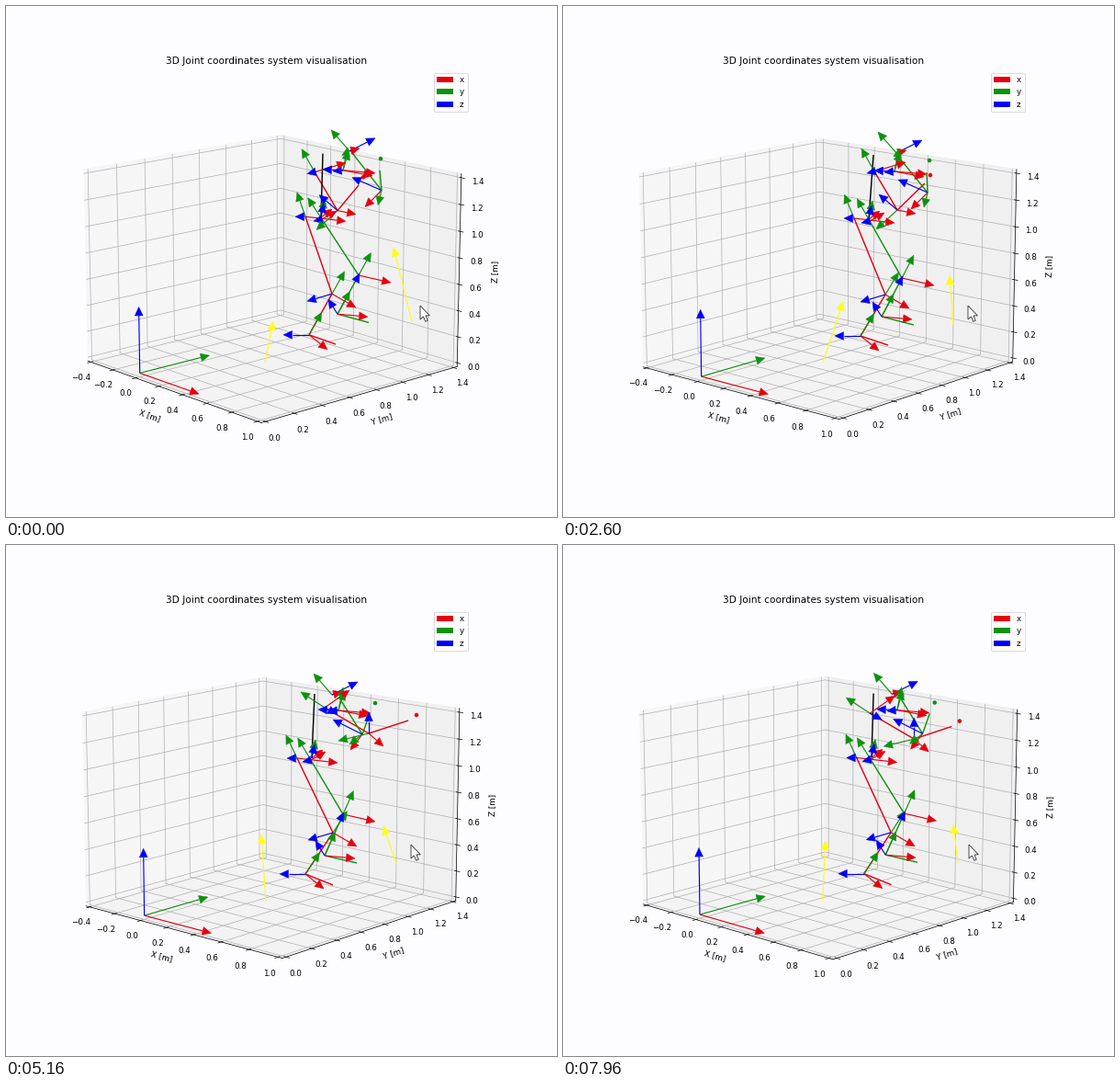
Animation of 600x556 px, one loop 8000 ms. Source, as a matplotlib script:

```python
import numpy as np
import matplotlib.pyplot as plt
from matplotlib.animation import FuncAnimation
from matplotlib.collections import LineCollection, PolyCollection
from matplotlib.patches import Patch, Polygon
from mpl_toolkits.mplot3d import proj3d

W, H, DPI = 600, 556, 64
STEP, LOOP = 40, 8000
BG = "#fdfcfe"
RED, GREEN, BLUE, YELLOW = "#e4000f", "#0e920e", "#0000fb", "#ffff12"
AXIS_COLORS = (RED, GREEN, BLUE)

# Joint in pixels: x, y, parallax when the view turns, shift when the arm is raised
JOINTS = {
    "hip_r": (317, 231, 9, (0, 1)),
    "knee_r": (351, 314, 4, (5, -1)),
    "ankle_r": (324, 359, 6, (2, -1)),
    "toe_r": (354, 369, 5, (2, 1)),
    "hip_l": (334, 234, 10, (-2, 0)),
    "knee_l": (369, 296, 15, (-2, -3)),
    "ankle_l": (347, 338, 14, (0, 0)),
    "toe_l": (382, 347, 13, (0, -1)),
    "pelvis": (333, 232, 10, (0, 0)),
    "neck": (338, 162, 7, (-2, 0)),
    "head": (363, 160, 11, (-8, 3)),
    "chest": (361, 180, 6, (1, 0)),
    "shoulder_l": (362, 160, 13, (2, 8)),
    "elbow_l": (397, 203, 12, (-9, 3)),
    "wrist_l": (396, 181, 11, (0, 3)),
    "hand_l": (399, 168, 9, (3, 4)),
    "shoulder_r": (339, 180, -3, (8, -3)),
    "elbow_r": (364, 222, -3, (31, -17)),
    "wrist_r": (394, 193, -10, (44, -2)),
    "hand_r": (400, 184, -11, (47, 1)),
}
ARM = ("shoulder_r", "elbow_r", "wrist_r", "hand_r")
ARM_DROP = np.array([-12, 6])

CHAINS = [
    (("hip_r", "knee_r", "ankle_r", "toe_r"), RED),
    (("hip_l", "knee_l", "ankle_l", "toe_l"), GREEN),
    (("shoulder_r", "elbow_r", "wrist_r"), RED),
    (("shoulder_l", "elbow_l", "wrist_l"), GREEN),
    (("pelvis", "neck"), "black"),
]
BONES = [(a, b, c) for chain, c in CHAINS for a, b in zip(chain, chain[1:])]

# Leg frames: x and z as offsets, y runs up along the bone
LEG_FRAMES = [
    ("ankle_r", ("ankle_r", "knee_r"), (20, 16), (-28, 0)),
    ("knee_r", ("ankle_r", "knee_r"), (26, 15), (-27, 8)),
    ("hip_r", ("knee_r", "hip_r"), (44, 5), (-11, 0)),
    ("ankle_l", ("ankle_l", "knee_l"), (33, 3), (-10, -16)),
    ("knee_l", ("ankle_l", "knee_l"), (35, 8), (1, -2)),
    ("hip_l", ("knee_l", "hip_l"), (16, -9), (-9, 2)),
]
# Other frames: x, y, z offsets with the arm low and, if different, raised
BODY_FRAMES = [
    ("pelvis", [(12, -9), (4, -20), (3, -15)]),
    ("head", [(11, -3), (-20, -23), (28, -14)]),
    ("chest", [(35, 3), (5, -25), (-22, -1)]),
    ("chest", [(32, 6), (6, -21), (-11, 1)]),
    ("shoulder_r", [(34, -10), (-14, -25), (-8, 2)], [(27, -19), (-26, -17), (13, 7)]),
    ("elbow_r", [(20, 4), (-23, 21), (-20, -17)], [(16, 14), (-33, 8), (0, -23)]),
    ("elbow_l", [(-18, 18), (-4, 16), (-32, -14)], [(-13, 17), (-14, 11), (-32, -16)]),
]

POINTER = np.array([(0, 0), (0, 15), (3.4, 12), (5.8, 17.3), (8.2, 16.2),
                    (5.9, 11), (10.3, 10.8)])

plt.rcParams.update({"font.family": "DejaVu Sans", "font.size": 9.87})
fig = plt.figure(figsize=(W / DPI, H / DPI), dpi=DPI, facecolor=BG)

SIDE, LEFT, BOTTOM = 447.5, 59.5, 40.3
ax = fig.add_axes([LEFT / W, BOTTOM / H, SIDE / W, SIDE / H], projection="3d")
ax.set_facecolor("none")
ax.set_title("3D Joint coordinates system visualisation", fontsize=11.82)
ax.set_xlabel("X [m]", labelpad=5)
ax.set_ylabel("Y [m]", labelpad=5)
ax.set_zlabel("Z [m]")
ax.set_xticks(np.arange(-2, 6) / 5)
ax.set_yticks(np.arange(8) / 5)
ax.set_zticks(np.arange(8) / 5)
ax.tick_params(axis="x", pad=4.3)
ax.tick_params(axis="y", pad=4.3)
PAD = 1.4 / 48
ax.set_xlim(-0.4 - PAD, 1 + PAD)
ax.set_ylim(-PAD, 1.4 + PAD)
ax.set_zlim(-PAD, 1.4 + PAD)
ax.legend(handles=[Patch(fc=c, lw=0, label=n) for c, n in zip(AXIS_COLORS, "xyz")],
          loc="upper right")

top = fig.add_axes([0, 0, 1, 1], zorder=5)
top.set_xlim(0, W)
top.set_ylim(H, 0)
top.axis("off")

frame_count = 1 + len(LEG_FRAMES) + len(BODY_FRAMES)
arrow_colors = list(AXIS_COLORS) * frame_count + [YELLOW] * 2
bones = LineCollection([], colors=[b[2] for b in BONES], linewidths=1.6, zorder=2)
shafts = LineCollection([], colors=arrow_colors, linewidths=1.3, zorder=3)
heads = PolyCollection([], facecolors=arrow_colors, edgecolors=arrow_colors,
                       linewidths=0.5, zorder=4)
for item in (bones, shafts, heads):
    top.add_collection(item, autolim=False)
dots = top.scatter([0, 0], [0, 0], s=26, c=[RED, GREEN], linewidths=0, zorder=5)
pointer = Polygon(POINTER, closed=True, fc="white", ec="#3a3a3a", lw=1, zorder=6)
top.add_patch(pointer)


def track(t, *points):
    """Straight-line motion through (time, value) points."""
    times, values = zip(*points)
    return np.interp(t, times, values)


def smooth(t, start, end):
    u = np.clip((t - start) / (end - start), 0, 1)
    return u * u * (3 - 2 * u)


def shifted(x, y, depth, turn):
    """Pixel position after the view has turned by the given share."""
    back = (1 - turn) * depth
    return np.array([x + back, y - 0.2 * back])


def head(tail, tip, length=9.5, half=4.4):
    """Triangle at the tip, pointing away from the tail."""
    d = tip - tail
    d = d / max(np.hypot(*d), 1e-6)
    base = tip - length * d
    side = half * np.array([-d[1], d[0]])
    return np.array([tip, base + side, base - side])


def world_axes():
    """Pixel ends of the half-metre axes at the origin."""
    pts = np.vstack([np.zeros(3), 0.5 * np.eye(3)])
    x, y, _ = proj3d.proj_transform(*pts.T, ax.get_proj())
    px = ax.transData.transform(np.column_stack([x, y]))
    px[:, 1] = H - px[:, 1]
    return [(px[0], p) for p in px[1:]]


def body_frames(joint, lift):
    arrows = []
    for name, (a, b), x, z in LEG_FRAMES:
        bone = joint[b] - joint[a]
        up = 28 * bone / np.hypot(*bone)
        arrows += [(joint[name], joint[name] + v) for v in (x, up, z)]
    for name, *poses in BODY_FRAMES:
        low, high = np.array(poses[0]), np.array(poses[-1])
        arrows += [(joint[name], joint[name] + v) for v in low + lift * (high - low)]
    return arrows


def forces(t, turn):
    """Ground forces: the two feet share a slowly falling total load."""
    total = 126 - 2.25 * t
    right = track(t, (0, 45), (1.2, 51), (4.28, 85), (5.16, 73), (8, 66))
    lean_r = track(t, (0, 9), (2.6, 22), (5.16, -5), (6.88, 2), (8, 3))
    lean_l = track(t, (0, -20), (2.6, -4), (5.16, -14), (6.88, -6), (8, -5))
    foot_r = shifted(283, 388, -1, turn)
    foot_l = shifted(425, 347, 17, turn)
    return [(foot_r, foot_r + (lean_r, -right)),
            (foot_l, foot_l + (lean_l, right - total))]


def draw(i):
    t = i * STEP / 1000
    turn = track(t, (0, 0), (0.84, 0.07), (1.7, 0.1), (2.58, 1), (7.56, 1), (7.96, 0.7))
    ax.view_init(elev=14.6 - 1.25 * turn, azim=-42 - 6 * turn)

    lift = smooth(t, 2.6, 4.2)
    drop = track(t, (5.16, 0), (8, 1))
    joint = {}
    for name, (x, y, depth, raised) in JOINTS.items():
        joint[name] = shifted(x, y, depth, turn) + lift * np.array(raised)
        if name in ARM:
            joint[name] += drop * ARM_DROP
    bones.set_segments([(joint[a], joint[b]) for a, b, _ in BONES])

    arrows = world_axes() + body_frames(joint, lift) + forces(t, turn)
    tips = [head(a, b) for a, b in arrows]
    shafts.set_segments([(a, (h[1] + h[2]) / 2) for (a, _), h in zip(arrows, tips)])
    heads.set_verts(tips)
    dots.set_offsets([joint["hand_r"], joint["hand_l"]])

    mouse_x = track(t, (0, 451), (0.84, 427), (1.7, 427), (2.58, 441),
                    (6.2, 441), (6.7, 450), (7.56, 450), (7.96, 442))
    mouse_y = track(t, (0, 326), (0.84, 331), (1.7, 331), (2.58, 326),
                    (6.2, 326), (6.7, 322), (7.56, 322), (7.96, 326))
    pointer.set_xy(POINTER + (mouse_x, mouse_y))
    return bones, shafts, heads, dots, pointer


anim = FuncAnimation(fig, draw, frames=LOOP // STEP, interval=STEP,
                     repeat=True, repeat_delay=0, blit=False)
plt.show()
```
